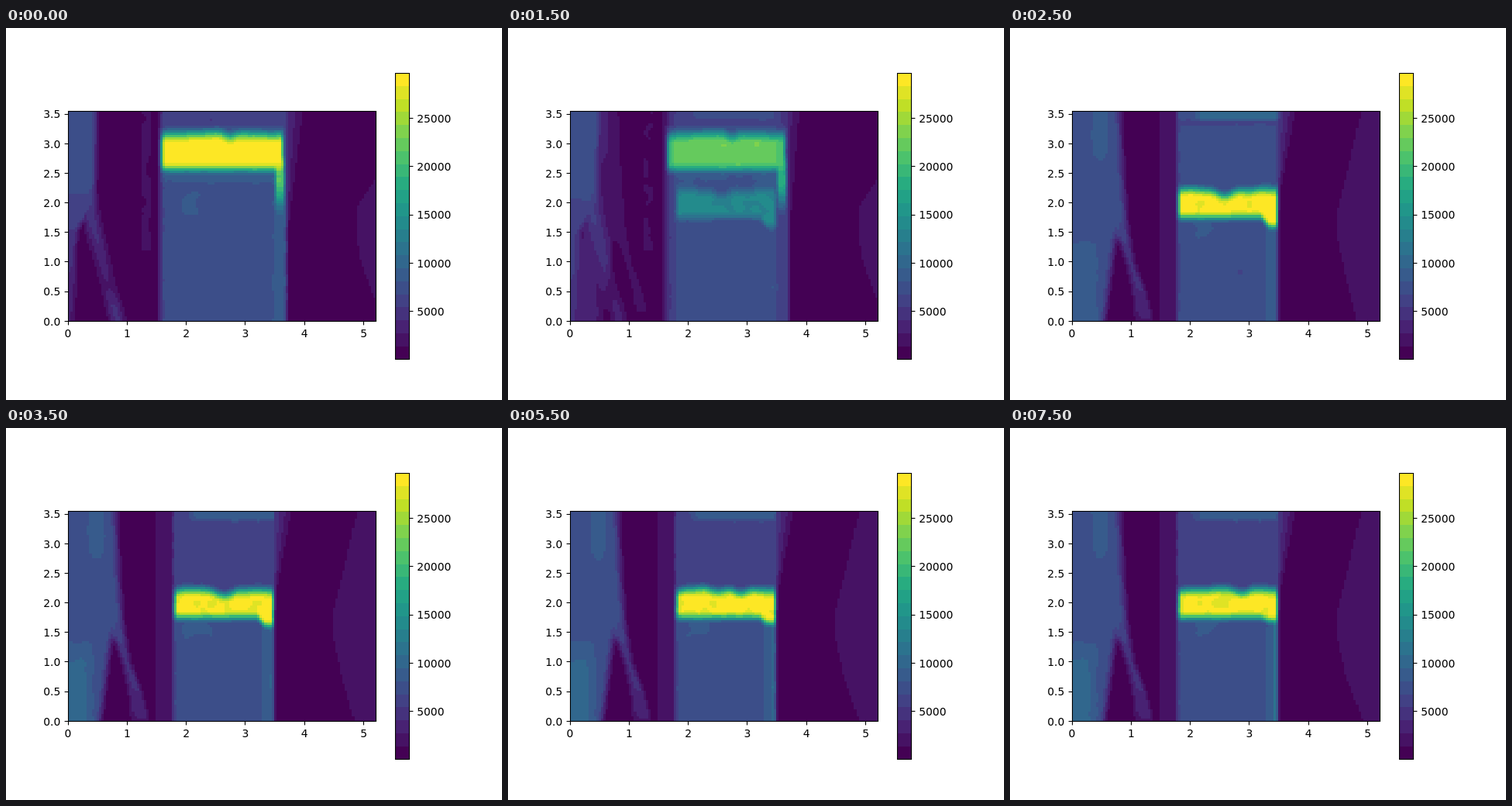
Write an HTML page with a canvas that moves like this. It is 640 px wide and 480 px high and loops after 8000 ms.

```html
<!DOCTYPE html>
<html lang="en">
<head>
<meta charset="utf-8">
<title>Heat map</title>
<style>
  html, body { margin: 0; width: 100%; height: 100%; overflow: hidden; background: #fff; }
  canvas { display: block; }
</style>
</head>
<body>
<canvas id="stage" width="640" height="480"></canvas>
<script>
const STEP = 500, STEPS = 16, LEVELS = 22;
const COLS = 130, ROWS = 89, CELL = 0.04;
const ctx = document.getElementById('stage').getContext('2d');
const grid = document.createElement('canvas');
grid.width = COLS;
grid.height = ROWS;
const gridCtx = grid.getContext('2d');
const image = gridCtx.createImageData(COLS, ROWS);

// Viridis, resampled to a few flat levels
const stops = ['440154', '482475', '414487', '355f8d', '2a788e', '21918c',
  '22a884', '44bf70', '7ad151', 'bddf26', 'fde725']
  .map(h => [0, 2, 4].map(i => parseInt(h.slice(i, i + 2), 16)));
const palette = Array.from({ length: LEVELS }, (_, i) => {
  const p = i / (LEVELS - 1) * 10, k = Math.min(9, Math.floor(p));
  return stops[k].map((c, j) => Math.round(mix(c, stops[k + 1][j], p - k)));
});

function mix(a, b, t) { return a + (b - a) * t; }
function clamp(v, lo, hi) { return Math.max(lo, Math.min(hi, v)); }
function rise(a, b, v) {
  const t = clamp((v - a) / (b - a), 0, 1);
  return t * t * (3 - 2 * t);
}
function fall(a, b, v) { return 1 - rise(a, b, v); }
function bump(v, centre, half) { return fall(0, half, Math.abs(v - centre)); }

// Piecewise linear curve through [y, value, y, value, ...]
function curve(y, p) {
  if (y <= p[0]) return p[1];
  for (let i = 2; i < p.length; i += 2) {
    if (y <= p[i]) return mix(p[i - 1], p[i + 1], (y - p[i - 2]) / (p[i] - p[i - 2]));
  }
  return p[p.length - 1];
}

function hash(i, j, seed) {
  const v = Math.sin(i * 127.1 + j * 311.7 + seed * 74.7) * 43758.5453;
  return (v - Math.floor(v)) * 2 - 1;
}
function noise(x, y, seed) {
  const i = Math.floor(x), j = Math.floor(y);
  const u = rise(0, 1, x - i), v = rise(0, 1, y - j);
  return mix(mix(hash(i, j, seed), hash(i + 1, j, seed), u),
    mix(hash(i, j + 1, seed), hash(i + 1, j + 1, seed), u), v);
}

// High, wide bar
function upperField(x, y, step, n) {
  const shift = Math.min(step / 3, 1) * 0.07, left = 1.6 + shift;
  let v = 0.4;

  const edge = curve(y, [0, 0.16, 1.5, 0.2, 2, 0.5, 3.55, 0.53]);
  v += curve(y, [0, 1.6, 1.2, 3, 2.2, 4.7, 3.55, 4.9]) * fall(edge - 0.14, edge + 0.03, x);
  if (y < 2.5) {
    const c = curve(y, [0, 0.84, 1.2, 0.53, 1.8, 0.38, 2.4, 0.3]);
    const amp = curve(y, [0, 2.8, 0.25, 2.8, 0.6, 1.5, 1.2, 2.4, 2, 3.6]);
    v = Math.max(v, 0.4 + amp * bump(x, c, 0.23));
  }
  if (x > 1.24 && x < 1.42 && y > 1.2) v = Math.max(v, 1.2 + 0.6 * n);

  const lens = curve(y, [0.2, 5.25, 1, 4.95, 1.5, 4.86, 1.9, 4.86, 2.5, 5.25]);
  if (x > lens) v = 1.4;

  const skirt = curve(y, [1.6, 3.73, 3.55, 3.98 - shift]);
  if (x > 3.6) v = Math.max(v, mix(3.6, 0.9, (x - 3.64) / (skirt - 3.64)));

  let base = mix(5.35, 4.3, rise(3.25, 3.38, y)) + 0.35 * n;
  base += 0.8 * bump(x, 2.05, 0.6) * bump(y, 1.95, 0.55);
  base += 1.1 * rise(3.42, 3.5, x) * fall(2.3, 2.6, y);
  base += 1.2 * bump(y, 2.45, 0.2);
  const body = rise(left - 0.13, left + 0.05, x) * fall(3.64, 3.73, x);
  v = Math.max(v, mix(v, base, body));

  const wave = 0.05 * noise(x * 3.2, 1, 4) - 0.06 * bump(x, 2.72, 0.2);
  const bar = rise(2.46, 2.7, y) * fall(3.02 + wave, 3.33 + wave * 0.7, y)
    * rise(left - 0.08, left + 0.05, x) * fall(3.58, 3.68, x);
  v = mix(v, 21.6 + 0.6 * n, bar);

  const leg = rise(1.72, 2.35, y) * fall(2.65, 2.85, y) * rise(3.47, 3.54, x) * fall(3.61, 3.69, x);
  return v + (9 + 3 * Math.min(step / 3, 1)) * leg * (1 - bar);
}

// Lower, narrower bar
function lowerField(x, y, step, n) {
  const settle = clamp((step - 5) / 2, 0, 1), late = clamp((step - 5) / 10, 0, 1);
  let v = 0.4;

  if (x < 1.5) {
    const edge = curve(y, [0, 1.42, 0.5, 1.3, 1, 1.12, 1.6, 1.02, 2.5, 0.95, 3.55, 0.9]);
    let level = 4.9 + 0.2 * n;
    level += 1.3 * fall(0.3, 0.55, x) * fall(1.1, 1.6, y);
    level += 0.9 * settle * fall(0.2, 0.42, x) * fall(0.7, 1.3, y);
    level += 1.2 * bump(x, 0.47, 0.28) * rise(2.4, 3, y);
    v += level * fall(edge - 0.2, edge + 0.01, x);
    if (y < 1.7) {
      if (x > 0.8) v = Math.min(v, curve(y, [0, 1.8, 0.3, 2.9, 1, 3.2, 1.7, 5]));
      const a = curve(y, [0, 0.5, 0.6, 0.58, 1.5, 0.7]);
      const b = curve(y, [0, 1.08, 0.5, 1.04, 1, 0.92, 1.5, 0.76]);
      v = mix(v, 0.3, rise(a - 0.06, a + 0.14, x) * fall(b - 0.08, b + 0.08, x) * fall(1.3, 1.7, y));
    }
  } else if (x < 1.8) {
    v = 1.4;
  }

  const lens = curve(y, [0, 4.82 + 0.1 * late, 0.8, 4.62, 1.5, 4.47, 1.8, 4.47, 2.5, 4.65, 3.55, 4.88]);
  if (x > lens) v = 1.4 + 0.05 * n;

  if (x > 3.4 && y > 1.9) {
    const skirt = curve(y, [2.1, 3.5, 3.55, 3.78]);
    v = Math.max(v, mix(4.2, 0.9, (x - 3.44) / (skirt - 3.44)));
  }

  let base = y > 2 ? 5.3 - 0.75 * settle : 5.3;
  base += 0.35 * n + 0.9 * bump(y, 1.6, 0.35) * bump(x, 2.2, 0.9);
  base += 2.1 * rise(3.35, 3.47, y) * rise(1.95, 2.25, x);
  base -= 0.8 * (1 - settle) * bump(y, 3.38, 0.07);
  base += 1.1 * rise(3.24, 3.3, x) * fall(1.5, 1.75, y);
  base += 2.4 * late * rise(3.38, 3.43, x) * fall(1.6, 1.9, y);
  const body = rise(1.72, 1.84, x) * fall(3.43, 3.52, x);
  v = Math.max(v, mix(v, base, body));

  const dip = mix(2.6, 2.88, rise(0.1, 0.5, late));
  const wave = 0.04 * noise(x * 4, step * 0.3, 8) - 0.07 * bump(x, dip, 0.25);
  const drop = (0.16 - 0.1 * late) * rise(3.18, 3.36, x);
  const bar = rise(1.66 - drop, 1.87 - drop, y) * fall(2.08 + wave, 2.36 + wave, y)
    * rise(1.75, 1.87, x) * fall(3.42, 3.51, x);
  return mix(v, 21.4 + 0.9 * n, bar);
}

const fade = [1, 0.9, 0.81, 0.7, 0.34];

function paintField(step) {
  const w = fade[step] || 0;
  for (let r = 0; r < ROWS; r++) {
    for (let c = 0; c < COLS; c++) {
      const x = (c + 0.5) * CELL, y = (ROWS - r - 0.5) * CELL;
      const n = 0.6 * noise(x * 7, y * 7, step + 20) + 0.5 * noise(x * 5, y * 5, 3);
      const v = (w && w * upperField(x, y, step, n)) + (w < 1 && (1 - w) * lowerField(x, y, step, n));
      const rgb = palette[clamp(Math.floor(v), 0, LEVELS - 1)];
      image.data.set([...rgb, 255], (r * COLS + c) * 4);
    }
  }
  gridCtx.putImageData(image, 0, 0);
  ctx.imageSmoothingEnabled = false;
  ctx.drawImage(grid, 80, 107.5, 397, 271);
}

function line(x1, y1, x2, y2) {
  ctx.beginPath();
  ctx.moveTo(x1, y1);
  ctx.lineTo(x2, y2);
  ctx.stroke();
}
function label(text, x, y, align) {
  ctx.textAlign = align;
  ctx.fillText(text, x, y);
}
const snap = v => Math.floor(v) + 0.5;

function paintAxes() {
  ctx.strokeStyle = ctx.fillStyle = '#000';
  ctx.lineWidth = 1.1;
  ctx.font = '13.89px "DejaVu Sans", sans-serif';
  ctx.strokeRect(80.5, 107.5, 397, 271);
  for (let i = 0; i <= 5; i++) {
    const x = 80 + i * 76.32;
    line(snap(x), 378.5, snap(x), 383.4);
    label(String(i), x, 399, 'center');
  }
  for (let i = 0; i <= 7; i++) {
    const y = 378.3 - i * 38.16;
    line(75.6, snap(y), 80.5, snap(y));
    label((i / 2).toFixed(1), 70.3, y + 5.3, 'right');
  }
}

function paintBar() {
  const top = 58, bottom = 427.5, h = (bottom - top) / LEVELS;
  palette.forEach((rgb, i) => {
    ctx.fillStyle = `rgb(${rgb})`;
    const y0 = Math.round(bottom - (i + 1) * h), y1 = Math.round(bottom - i * h);
    ctx.fillRect(502, y0, 18.5, y1 - y0);
  });
  ctx.fillStyle = '#000';
  ctx.strokeRect(502.5, 58.5, 18, 369);
  for (let i = 1; i <= 5; i++) {
    const y = 427.8 - i * 62.25;
    line(520.5, snap(y), 525.4, snap(y));
    label(String(i * 5000), 530.2, y + 5.3, 'left');
  }
}

function paint(step) {
  ctx.fillStyle = '#fff';
  ctx.fillRect(0, 0, 640, 480);
  paintField(step);
  paintAxes();
  paintBar();
}

const start = performance.now();
let shown = -1;
function tick() {
  const step = Math.floor((performance.now() - start) / STEP) % STEPS;
  if (step !== shown) paint(shown = step);
  requestAnimationFrame(tick);
}
tick();
</script>
</body>
</html>
```
